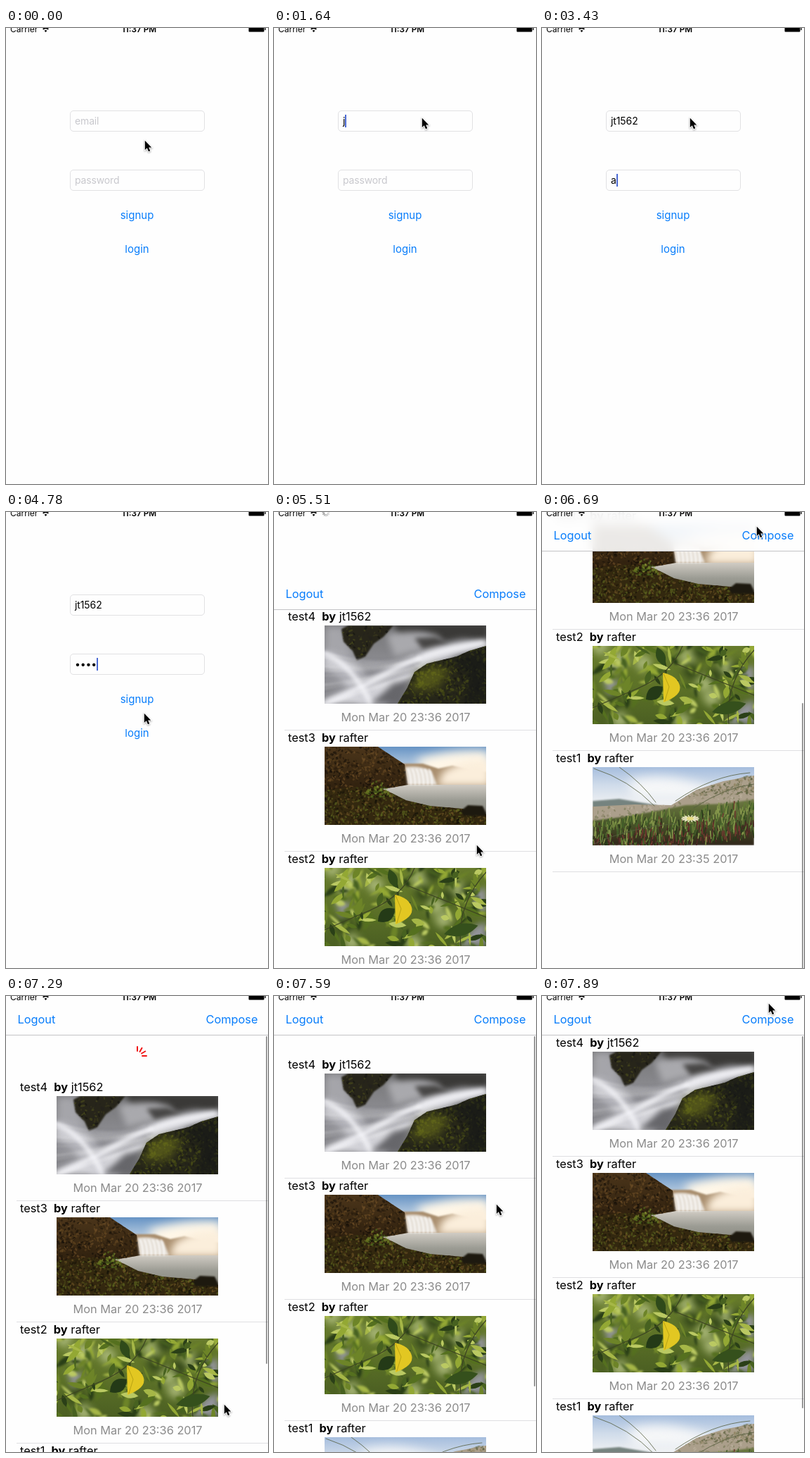
An HTML page with a canvas for the animation above (8000 ms loop, 373 px wide and 647 px high).

```html
<!DOCTYPE html>
<html lang="en">
<head>
<meta charset="utf-8">
<title>Sign in and feed</title>
<style>
* { box-sizing: border-box; }
html, body { margin: 0; width: 100%; height: 100%; overflow: hidden; background: #fefefe; }
body { position: relative; font: 16.35px/20px Inter, "Open Sans", sans-serif; color: #000; }
div, canvas, svg, .hint { position: absolute; white-space: pre; }
.field { left: 91px; width: 192px; height: 30px; border: 1px solid #e1e1e3; border-radius: 5px;
  padding-left: 6px; display: flex; align-items: center; font-size: 14px; letter-spacing: -.1px; }
.hint { left: 6px; color: #c8c8cd; letter-spacing: -.15px; }
.caret { width: 2px; height: 18px; background: #4a69d4; }
.link { left: 0; width: 373px; text-align: center; font-size: 15px; color: #087dfb; }
#feed { left: 0; top: 0; width: 373px; height: 667px; background: #fefefe; }
#rows { left: 0; top: 55px; width: 373px; }
.row { left: 0; width: 373px; height: 172px; }
.row::after { content: ""; position: absolute; left: 15px; right: 0; top: 171px; height: 1px; background: #dfdfe2; }
.title { left: 20px; top: 0; }
.title b { font-weight: 700; }
.row canvas { left: 72px; top: 23px; }
.date { left: 0; width: 375px; top: 143px; text-align: center; color: #8b8b8b; }
#nav { left: 0; top: -10px; width: 373px; height: 66px; border-bottom: 1px solid #c3c3c6;
  background: rgba(254,254,254,.9); backdrop-filter: blur(8px); color: #087dfb; }
#nav div { top: 33px; }
#bar { left: 369.5px; width: 2.5px; border-radius: 2px; background: rgba(0,0,0,.4); }
#status { left: 0; top: -8px; width: 373px; font-size: 12px; }
#clock { left: 139px; width: 101px; text-align: center; font-weight: 600; font-size: 11.8px; }
svg { left: 0; top: 0; overflow: visible; }
#cursor { filter: drop-shadow(0 1px 1px rgba(0,0,0,.35)); }
</style>
</head>
<body>
<div class="field" style="top:117px"><span class="hint">email</span><span id="email"></span><span class="caret"></span></div>
<div class="field" style="top:201px"><span class="hint">password</span><span id="pass"></span><span class="caret"></span></div>
<div class="link" style="top:256px">signup</div>
<div class="link" id="go" style="top:304px">login</div>
<div id="feed">
  <svg id="pull" width="1" height="1"></svg>
  <div id="rows"></div>
  <div id="nav"><div style="left:16.5px">Logout</div><div style="right:14.5px">Compose</div></div>
  <div id="bar"></div>
</div>
<div id="status"><div style="left:6px">Carrier</div><div id="clock">11:37 PM</div></div>
<svg width="373" height="20">
  <path d="M56.5 6L54.6 3.8Q56.5 2.3 58.4 3.8ZM53.3 2.5L52 1.1Q56.5-2.4 61 1.1L59.7 2.5Q56.5-.1 53.3 2.5Z"/>
  <rect x="345.5" y="-3" width="22" height="8.5" rx="1"/><path d="M368.4-1h1.3v4h-1.3z"/>
  <g id="busy" transform="translate(74 1)"></g>
</svg>
<svg id="cursor" width="14" height="20">
  <path d="M.8.8V14L3.8 11.2 6 16.2 8.3 15.2 6.2 10.4H10.3Z" stroke="#fff" stroke-width="1.8" paint-order="stroke"/>
</svg>
<script>
const LOOP = 8000, TICK = 148.8, USER = 'jt1562', OTHER = 'rafter', SECRET = 'asdf';
const $ = id => document.getElementById(id);
const clamp = (v, lo, hi) => Math.min(hi, Math.max(lo, v));

// Seeded random numbers
const seeded = s => () => (s = s * 16807 % 2147483647) / 2147483647;

// Painting helpers
function brush(c, blur, paint) {
  c.filter = blur ? `blur(${blur}px)` : 'none';
  paint();
  c.filter = 'none';
}
function fill(c, color, d, blur) {
  c.fillStyle = color;
  brush(c, blur, () => c.fill(new Path2D(d)));
}
function line(c, color, width, d, blur) {
  c.strokeStyle = color;
  c.lineWidth = width;
  c.lineCap = 'round';
  brush(c, blur, () => c.stroke(new Path2D(d)));
}
function fade(c, y0, y1, ...colors) {
  const g = c.createLinearGradient(0, y0, 0, y1);
  colors.forEach((k, i) => g.addColorStop(i / (colors.length - 1), k));
  return g;
}
// Fine grain inside a shape
function grain(c, rnd, n, size, colors, d) {
  c.save();
  c.clip(new Path2D(d));
  c.globalAlpha = .6;
  for (let i = 0; i < n; i++) {
    c.fillStyle = colors[Math.floor(rnd() * colors.length)];
    c.beginPath();
    c.ellipse(rnd() * 230, rnd() * 111, size * (.4 + rnd()), size * (.3 + rnd() * .5), rnd() * 3, 0, 7);
    c.fill();
  }
  c.restore();
}
function leaf(c, color, x, y, len, wide, turn, blur) {
  c.save();
  c.translate(x, y);
  c.rotate(turn);
  fill(c, color, `M0 0Q${len / 2} ${-wide} ${len} 0Q${len / 2} ${wide} 0 0Z`, blur);
  c.restore();
}
const ALL = 'M0 0H230V111H0Z';

function stream(c, rnd) {
  fill(c, fade(c, 0, 111, '#757577', '#8d8d92', '#77777c'), ALL);
  fill(c, '#a5a5aa', 'M0 0H28L40 40 60 80H0Z', 6);
  fill(c, '#3a3937', 'M96 -4H234V22L196 18 165 24 140 12 110 20Z', 4);
  fill(c, '#a9a9ad', 'M88 14Q125 4 160 14L170 26 100 44Z', 5);
  fill(c, '#484746', 'M128 18L158 16 178 26 140 34Z', 3);
  const rock = 'M24 5L34 0H98L84 16 70 26 58 44 46 50 40 36 27 23Z';
  fill(c, '#27251a', rock, 1);
  grain(c, rnd, 700, 2.5, ['#4c4d1d', '#39371d', '#131310', '#23221d'], rock);
  fill(c, '#d9d9de', 'M232 20Q165 26 126 44T0 104V111H84L130 66Q165 44 232 34Z', 4);
  fill(c, '#d0d0d6', 'M0 36Q40 44 66 80L88 111H50Q30 76 0 58Z', 5);
  for (let i = 0; i < 24; i++) {
    const y = i * 3.4, tone = i % 2 ? '255,255,255' : '84,83,92';
    line(c, `rgba(${tone},.4)`, 1 + rnd() * 3,
      `M-5 ${34 + y}Q${60 + rnd() * 20} ${62 + y * .3} ${125 + rnd() * 15} ${42 + y * .3}`, 2);
  }
  line(c, '#f6f6fa', 6, 'M0 40Q38 54 66 111M225 26Q150 34 92 66T0 111', 3);
  fill(c, '#66666a', 'M66 111L98 82 122 78 108 111Z', 4);
  const bank = 'M104 111L118 88 128 66 146 54 188 44 206 36 230 29V111Z';
  fill(c, '#262619', bank);
  grain(c, rnd, 2200, 2.5, ['#555a18', '#3c4214', '#20201a', '#2c2c1a', '#161613'], bank);
  fill(c, 'rgba(110,116,28,.6)', 'M122 92L134 64 160 56 178 66 158 92Z', 6);
  fill(c, 'rgba(24,25,24,.7)', 'M182 48L230 32V111H196L206 74Z', 5);
}

function falls(c, rnd) {
  fill(c, fade(c, 0, 45, '#6693c4', '#a8c1db', '#ecdfcc'), ALL);
  fill(c, '#fff7e8', 'M130 18Q180 2 234 6V50H150Z', 7);
  fill(c, '#a98e6e', 'M110 24L140 24 162 31 182 27 204 32 232 36V56H116Z', 1);
  fill(c, '#fbeedb', 'M168 36Q200 14 236 20V56H160Z', 6);
  fill(c, fade(c, 52, 100, '#d5d0c8', '#9b9b93', '#85857c'), 'M80 54H230V111H60Z');
  const cliff = 'M0 0H76L94 12 114 25 119 54 96 58 66 62 0 74Z';
  fill(c, fade(c, 0, 70, '#4b351a', '#2c1e0d'), cliff);
  grain(c, rnd, 1800, 2.2, ['#5c421d', '#6e4f27', '#261a0c', '#130e07', '#33240f'], cliff);
  fill(c, '#e8e2da', 'M115 29Q134 26 152 34L160 54H118Z', 1.5);
  for (let x = 119; x < 154; x += 6) line(c, '#fff', 1.5, `M${x} 32Q${x + 4} 40 ${x + 4} 54`, 1);
  const bank = 'M0 62L40 57 76 57 96 66 116 76 150 84 196 88 230 96V111H0Z';
  fill(c, '#33280f', bank);
  grain(c, rnd, 2600, 2.2, ['#4c4a18', '#6f5425', '#392b11', '#120f08', '#241b0b', '#606a20'], bank);
  grain(c, rnd, 1500, 2.4, ['#6f8423', '#4a6a1d', '#8b9d35', '#28310f'], 'M58 64L72 46 86 52 96 72H62Z');
  fill(c, '#1d190f', 'M194 91L204 83 225 84 230 94V98H198Z', 1);
}

function leaves(c, rnd) {
  fill(c, fade(c, 0, 111, '#677b2c', '#5d7228', '#4b5f22'), ALL);
  for (let i = 0; i < 16; i++) {
    const x = rnd() * 230, y = rnd() * 111;
    fill(c, i % 3 ? '#a9b777' : '#31441a', `M${x - 14} ${y}l14-14 14 14-14 14z`, 6);
  }
  fill(c, '#94959c', 'M210 34L230 28V62H214ZM212 84L230 76V111H190ZM14 44L40 52 24 72Z', 5);
  const greens = ['#93a834', '#bac962', '#6d8428', '#476120', '#2a3f17', '#a6b747', '#55701f'];
  for (let i = 0; i < 230; i++)
    leaf(c, greens[i % 7], rnd() * 250 - 15, rnd() * 125 - 10, 10 + rnd() * 22, 3 + rnd() * 6, rnd() * 6.3, i < 110 ? 1.5 : .4);
  line(c, '#3d4522', 1.3, 'M128 0Q112 40 65 60T0 88M230 6Q188 52 194 111M118 25L230 70');
  leaf(c, '#243a17', 76, 76, 30, 18, -.65);
  leaf(c, '#2f4a1a', 92, 2, 28, 13, 1.2);
  leaf(c, '#35501c', 170, 94, 50, 17, -.25);
  fill(c, '#e2c722', 'M100 38Q120 42 124 56T101 80Z');
  line(c, '#b9a314', 1, 'M101 39L109 58 103 78');
}

function dunes(c, rnd) {
  fill(c, fade(c, 0, 50, '#a5bddd', '#cfdbea', '#eceff2'), ALL);
  fill(c, '#f6f7f8', 'M50 20Q90 8 135 20T180 44H60Z', 8);
  fill(c, '#75837f', 'M0 48L38 45 92 54V66H0Z', 1);
  const sand = 'M0 56L60 53 112 54 148 32 186 20 230 12V84H0Z';
  fill(c, '#ab9f8b', sand);
  grain(c, rnd, 700, 2.2, ['#8b8468', '#c0b5a2', '#777a55'], sand);
  grain(c, rnd, 2200, 2.2, ['#66694a', '#918565', '#555c3a'], 'M142 42L172 26 200 19 222 11 230 12V40L185 38Z');
  fill(c, fade(c, 50, 111, '#68743f', '#485429', '#302519'), 'M0 76L48 70 92 62 132 54 184 52 230 46V111H0Z', 1);
  const tints = ['#647c37', '#445f2a', '#86984c', '#70392f', '#4c2724', '#2a3a1b'];
  for (let i = 0; i < 650; i++) {
    const x = rnd() * 230, depth = rnd(), y = 82 - x * .12 + depth * 48;
    const tint = tints[Math.floor(rnd() * 3) + (rnd() < depth * .8 ? 3 : 0)];
    line(c, tint, 1.6, `M${x} ${y}l${rnd() * 5 - 2} ${-4 - rnd() * 8}`);
  }
  line(c, '#555e3e', .8, 'M2 2Q52 18 88 55M38 0Q70 22 90 50M118 48Q170 12 224 8M0 110Q50 86 120 80M144 58Q190 28 230 24');
  for (let a = 0; a < 6.3; a += .45)
    line(c, '#f1eecb', 1.5, `M139 73l${12 * Math.cos(a)} ${4.5 * Math.sin(a)}`);
  fill(c, '#e6dc83', 'M134 73a5 2.4 0 1 0 10 0a5 2.4 0 1 0-10 0');
}

[stream, falls, leaves, dunes].forEach((paint, i) => {
  const row = document.createElement('div');
  row.className = 'row';
  row.style.top = i * 172 + 'px';
  row.innerHTML = `<div class="title">test${4 - i}  <b>by</b> ${i ? OTHER : USER}</div>` +
    `<canvas width="230" height="111"></canvas><div class="date">Mon Mar 20 23:${i < 3 ? 36 : 35} 2017</div>`;
  $('rows').append(row);
  paint(row.querySelector('canvas').getContext('2d'), seeded(i * 7919 + 11));
});

// Spinner spokes, clockwise from the top
const spokes = (r0, r1, w, color) => Array.from({ length: 12 }, (_, i) =>
  `<path d="M0 ${-r0}V${-r1}" transform="rotate(${i * 30})" stroke="${color}" stroke-width="${w}" stroke-linecap="round"/>`).join('');
$('pull').innerHTML = spokes(7, 13, 2, '#f01414');
$('busy').innerHTML = spokes(2.6, 5, 1, '#444');

// Key points: tick, then values; eased in between
const pointer = [[0, 197, 159], [1, 204, 142], [2, 204, 142], [3, 207, 129], [6, 210, 127], [29, 210, 127],
  [33, 193, 314], [35, 193, 314], [37, 288, 472], [42, 295, 458], [45, 305, 20], [49, 310, 579], [53, 322, 10]];
const scroll = [[42, 0], [45, 232], [49, -64], [53, -1]];

function along(keys, n) {
  const i = keys.findLastIndex(k => k[0] <= n);
  const a = keys[Math.max(0, i)], b = keys[i + 1];
  if (i < 0 || !b) return a.slice(1);
  const p = (n - a[0]) / (b[0] - a[0]), e = p * p * (3 - 2 * p);
  return a.slice(1).map((v, j) => v + (b[j + 1] - v) * e);
}

function field(id, text, caret) {
  const el = $(id);
  el.textContent = text;
  el.previousElementSibling.style.display = text ? 'none' : '';
  el.nextElementSibling.style.visibility = caret ? 'visible' : 'hidden';
}

// Typing speeds up after the first letters; the caret blinks while empty
function typeEmail(n) {
  const count = clamp(Math.floor(Math.max((n - 8) / 2, n - 12)), 0, USER.length);
  field('email', USER.slice(0, count), n >= 4 && n < 21 && (count || n % 4 < 2));
}

// Only the newest letter of the password is readable
function typePass(n) {
  const count = clamp(Math.floor((n - 21) / 2), 0, SECRET.length);
  const open = n < 31 ? SECRET.slice(count - 1, count) : '';
  field('pass', '•'.repeat(count - open.length) + open, n >= 21);
}

// Sheet rises on a critically damped spring
function slide(n) {
  const k = Math.max(0, n - 35) * 1.8;
  return Math.round(657 * (1 + k) * Math.exp(-k));
}

function scrollbar(s, shown) {
  const max = 85, h = 529 - Math.max(0, -s, s - max);
  const top = s > max ? 653 - h : 57 + Math.max(0, s) * 67 / max;
  Object.assign($('bar').style, { top: top + 'px', height: h + 'px', display: shown ? '' : 'none' });
}

function draw(t) {
  const n = Math.floor((t + 8) / TICK);
  const [x, y] = along(pointer, n);
  const s = Math.round(along(scroll, n)[0]);
  $('cursor').style.transform = `translate(${Math.round(x)}px,${Math.round(y)}px)`;
  typeEmail(n);
  typePass(n);
  $('go').style.opacity = n === 34 ? .3 : 1;

  $('feed').style.transform = `translateY(${slide(n)}px)`;
  $('rows').style.transform = `translateY(${-s}px)`;
  scrollbar(s, n > 42);

  const ready = (-s - 40) / 6;
  $('pull').style.transform = `translate(187px,${53 - s / 2}px)`;
  [...$('pull').children].forEach((p, i) => p.style.opacity = i < ready ? 1 : 0);

  $('busy').style.display = n >= 34 && n < 41 ? '' : 'none';
  [...$('busy').children].forEach((p, i) => p.style.opacity = (1 + (i + 60 - n) % 12) / 12);
}

const start = performance.now();
(function loop() {
  draw((performance.now() - start) % LOOP);
  requestAnimationFrame(loop);
})();
</script>
</body>
</html>
```
